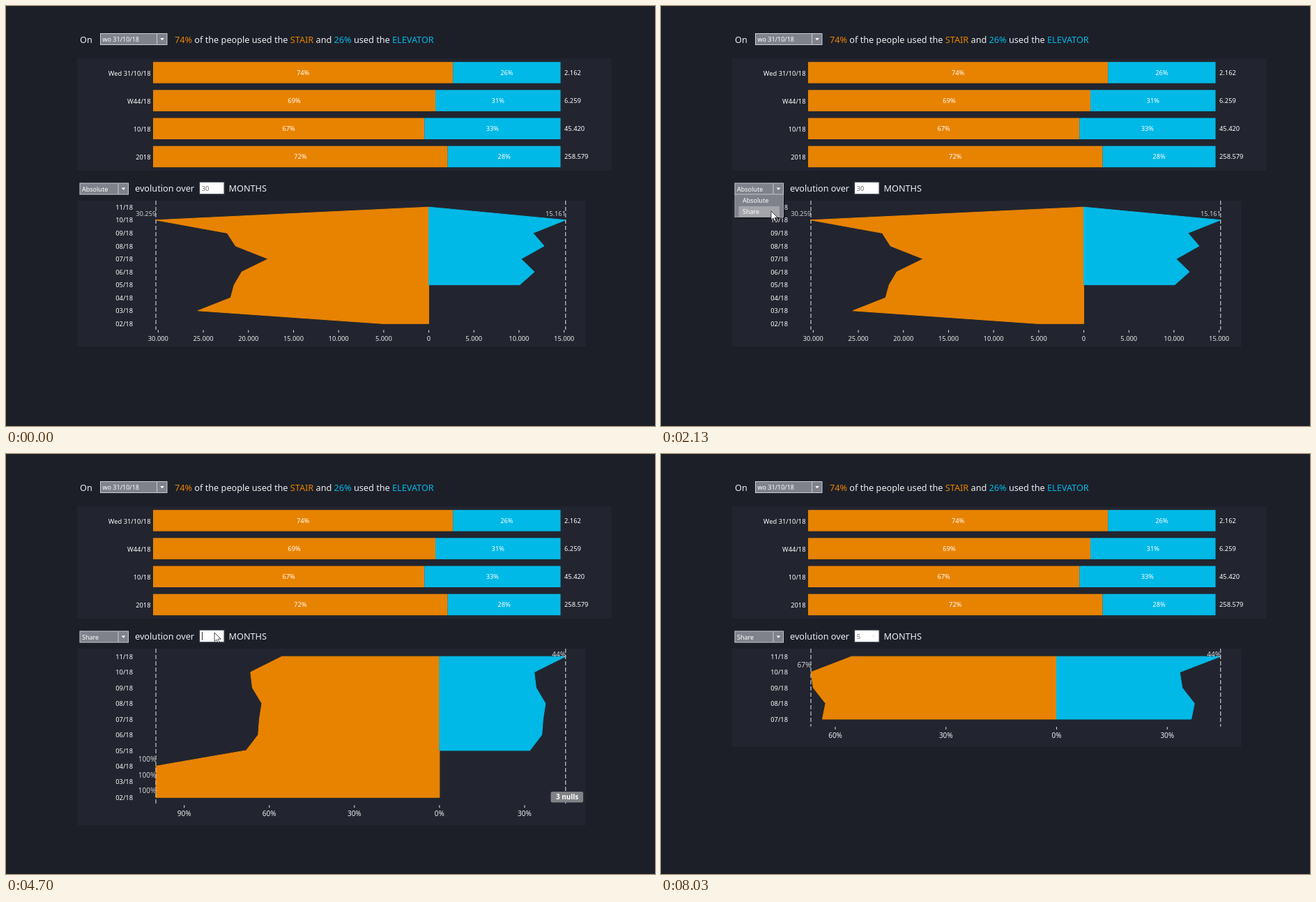
An HTML page for the animation above (8940 ms loop, 931 by 602 pixels).

```html
<!DOCTYPE html>
<html lang="en">
<head>
<meta charset="utf-8">
<title>Stair and elevator use</title>
<style>
  html, body { margin: 0; width: 100%; height: 100%; overflow: hidden; background: #1c1f28; }
  svg { display: block; font: 9.3px "Noto Sans", "Open Sans", sans-serif; }
  .head { font-size: 12.7px; font-weight: 300; }
  .ui { font-size: 9px; }
</style>
</head>
<body>
<svg id="stage" width="931" height="602" viewBox="0 0 931 602">
  <g id="top"></g>
  <g id="chart"></g>
  <g id="controls"></g>
  <g id="popup"></g>
  <path id="arrow" d="M0 0V12.6L3 10L5 14.6L7.1 13.7L5.2 9.2H9.2Z" fill="#fff" stroke="#000" stroke-width=".7"/>
  <path id="beam" d="M-3 -8H3M0 -8V8M-3 8H3" fill="none" stroke="#222"/>
</svg>
<script>
const LOOP = 8940;
const ORANGE = '#e88300', BLUE = '#00b9e6', PANEL = '#22252f', GREY = '#7f828a';
const WHITE = '#fff', PALE = '#eeeef0', SOFT = '#d0d1d4';
const $ = id => document.getElementById(id);

const rect = (x, y, x2, y2, fill, more = '') =>
  `<rect x="${x}" y="${y}" width="${x2 - x}" height="${y2 - y}" fill="${fill}" ${more}/>`;
const line = (d, stroke, more = '') => `<path d="${d}" fill="none" stroke="${stroke}" ${more}/>`;
const text = (x, y, str, { fill = WHITE, anchor = 'start', more = '' } = {}) =>
  `<text x="${x}" y="${y}" fill="${fill}" text-anchor="${anchor}" ${more}>${str}</text>`;
const heading = (x, y, str) => text(x, y, str, { fill: PALE, more: 'class="head"' });
const ui = (x, y, str) => text(x, y, str, { more: 'class="ui"' });
const tint = (fill, str) => `<tspan fill="${fill}">${str}</tspan>`;

function dropdown(x, y, x2, label) {
  const split = x2 - 15;
  return rect(x + .5, y + .5, x2 - .5, y + 16.5, GREY, 'stroke="#c9cbd0"') +
    line(`M${split} ${y + 1}v15`, '#c9cbd0') +
    `<path d="M${split + 4.7} ${y + 7}h5.6l-2.8 3.2z" fill="${WHITE}"/>` +
    ui(x + 3.5, y + 12.3, label);
}

function drawTop() {
  const left = 211, right = 795.5;
  const rows = [
    ['Wed 31/10/18', 73.6, '2.162'], ['W44/18', 69.3, '6.259'],
    ['10/18', 66.6, '45.420'], ['2018', 72.3, '258.579']
  ];
  const bars = rows.map(([name, share, total], i) => {
    const y = 80.2 + i * 40.15, base = y + 18.8, stairs = Math.round(share);
    const split = left + (right - left) * share / 100;
    return rect(left, y, split, y + 30.5, ORANGE) + rect(split, y, right, y + 30.5, BLUE) +
      text(207.5, base + .7, name, { anchor: 'end' }) +
      text((left + split) / 2, base, stairs + '%', { anchor: 'middle' }) +
      text((split + right) / 2, base, 100 - stairs + '%', { anchor: 'middle' }) +
      text(801, base, total);
  });
  const summary = `${tint(ORANGE, '74%')} of the people used the ${tint(ORANGE, 'STAIR')} and ` +
    `${tint(BLUE, '26%')} used the ${tint(BLUE, 'ELEVATOR')}`;
  $('top').innerHTML = rect(102, 75.5, 868.5, 236, PANEL) + bars.join('') +
    heading(106, 53, 'On') + heading(242, 53, summary) + dropdown(135, 39, 231.5, 'wo 31/10/18');
}

// Thousands of users per month, newest month first
const stair = [.05, 30.259, 22.35, 21.43, 17.8, 20.73, 21.58, 21.97, 25.6, 5.13];
const lift = [.04, 15.161, 11.54, 12.78, 10.23, 11.7, 10.08];
const TOP = 279, LEFT = 215, RIGHT = 802.7;

// Both sides share one scale that spans the two dashed limits
function drawChart({ share, months }) {
  const pitch = share ? 22.45 : 18.56, size = share ? 10 : 9.3, gap = share ? 30 : 5;
  const end = TOP + pitch * months;
  const rowY = i => TOP + pitch * (i + .5);
  const values = part => part.slice(0, months).map((v, i) =>
    share ? 100 * v / (stair[i] + (lift[i] || 0)) : v);
  const label = v => share ? Math.round(v) + '%' : v.toFixed(3);
  const tickLabel = v => share ? v + '%' : v ? v + '.000' : '0';

  const sides = [[stair, -1, ORANGE, LEFT], [lift, 1, BLUE, RIGHT]].map(([part, sign, fill, edge]) => {
    const vals = values(part);
    return { vals, sign, fill, edge, max: Math.max(...vals) };
  });
  const scale = (RIGHT - LEFT) / (sides[0].max + sides[1].max);
  const zero = LEFT + sides[0].max * scale;

  let out = rect(102, TOP, 832, end + (share ? 28.4 : 23.5), PANEL), marks = '';
  for (const { vals, sign, fill, edge, max } of sides) {
    const pts = vals.map((v, i) => [zero + sign * v * scale, rowY(i)]);
    pts.push([zero, rowY(vals.length - 1)], [zero, rowY(0)]);
    out += `<polygon points="${pts.join(' ')}" fill="${fill}" stroke="${fill}" stroke-linejoin="round"/>`;
    marks += line(`M${edge} ${TOP}V${end - .5}`, '#b9bbc0', 'stroke-width="1.3" stroke-dasharray="6 3"');
    vals.forEach((v, i) => {
      if (v === max) marks += text(edge + .3, Math.max(291, rowY(i) - 6.3), label(v),
        { fill: SOFT, anchor: 'end', more: `font-size="${size}"` });
    });
    for (let n = 0; n <= max; n += gap) {
      const x = zero + sign * n * scale;
      if (n || sign > 0) marks += line(`M${x} ${end}v3.5`, PALE) +
        text(x, end + 15.5, tickLabel(n), { fill: PALE, anchor: 'middle', more: `font-size="${size}"` });
    }
  }
  for (let i = 0; i < months; i++)
    marks += text(182, rowY(i) + 3.6, String(11 - i).padStart(2, '0') + '/18', { anchor: 'end' });
  const nulls = months - sides[1].vals.length;
  if (share && nulls)
    marks += rect(781.5, 484, 828, 499.5, '#808285', 'rx="2"') +
      text(805, 495.3, nulls + ' nulls', { anchor: 'middle', more: 'font-size="9.9" font-weight="700"' });
  $('chart').innerHTML = out + marks;
}

function drawControls({ mode, entry, caret, clear }) {
  let out = dropdown(105.5, 253.5, 176, mode) +
    heading(185, 266, 'evolution over') + heading(319.5, 266, 'MONTHS') +
    rect(276.5, 251.5, 314, 270.5, '#2c323d') + rect(278, 252.8, 312.5, 269.2, WHITE) +
    text(280.8, 264.5, entry, { fill: '#6b6b6b' });
  if (clear) out += line('M302.5 258.5l5 5m0-5l-5 5', '#eee');
  if (caret) out += line(`M${281.5 + entry.length * 5.5} 255v12`, '#333');
  $('controls').innerHTML = out;
}

function drawPopup(hover) {
  const light = hover < 0 ? '' : rect(111.5, 271 + hover * 16, 170, 286.5 + hover * 16, '#a3a5aa');
  $('popup').innerHTML = rect(108, 272, 178, 305, '#000', 'opacity=".3"') +
    rect(106, 270, 175.5, 302.5, GREY, 'stroke="#b4b6bb" stroke-width=".8"') + light +
    ui(117, 282, 'Absolute') + ui(117, 298, 'Share');
}

// Pointer stops: start, end, x, y; each move begins where the previous one ended
const STEP = 75, ENTRY = [270, 560], GONE = 8030;
const stops = [
  [230, 630, 203, 275], [700, 780, 176, 262], [1040, 1180, 169, 260], [1730, 1800, 163, 268],
  [1940, 2130, 158, 294], [2900, 2990, 172, 291], [3070, 3680, 290, 246], [3830, 3830, 299, 258],
  [4700, 4700, 299, 256], [5610, 5840, 466, 259], [5910, 5990, 455, 249], [6160, 6230, 465, 258],
  [7090, 7090, 462, 257], [7320, 7955, 880, 590]
];
const smooth = p => p * p * (3 - 2 * p);

function pointer(t) {
  const at = stops.filter(s => s[0] <= t).length - 1;
  if (at < 0 || t >= GONE) return null;
  const [start, end, x, y] = stops[at];
  const [fromX, fromY] = at ? stops[at - 1].slice(2) : ENTRY;
  const count = Math.round((end - start) / STEP) + 1;
  const gap = (end - start) / (count - 1) || STEP;
  const step = Math.min(count, Math.floor((t - start) / gap + .05) + 1);
  const p = smooth(step / count);
  return [fromX + (x - fromX) * p, fromY + (y - fromY) * p];
}

// Runs a drawing only when its input differs from the last one
const last = {};
function refresh(key, state, draw) {
  const id = JSON.stringify(state);
  if (last[key] === id) return;
  last[key] = id;
  draw(state);
}

function place(el, pos, shown) {
  el.style.display = shown ? '' : 'none';
  if (shown) el.setAttribute('transform', `translate(${pos})`);
}

function render(t) {
  const pos = pointer(t), share = t >= 2900, inField = t >= 3830 && t < 4700;
  refresh('chart', { share, months: t < 6460 ? 10 : 5 }, drawChart);
  refresh('controls', {
    mode: share ? 'Share' : 'Absolute',
    entry: t < 4700 ? '30' : t < 5070 ? '' : '5',
    caret: t >= 4210 && t < 5610,
    clear: t >= 3830
  }, drawControls);

  const open = t >= 1340 && t < 2670;
  $('popup').style.display = open ? '' : 'none';
  $('popup').style.opacity = t < 1420 || t >= 2600 ? .5 : 1;
  if (open) refresh('popup', Math.floor((pos[1] - 271) / 16), drawPopup);

  place($('arrow'), pos, pos && !inField);
  place($('beam'), pos, pos && inField);
}

drawTop();
const began = performance.now();
function tick() {
  render((performance.now() - began) % LOOP);
  requestAnimationFrame(tick);
}
tick();
</script>
</body>
</html>
```
